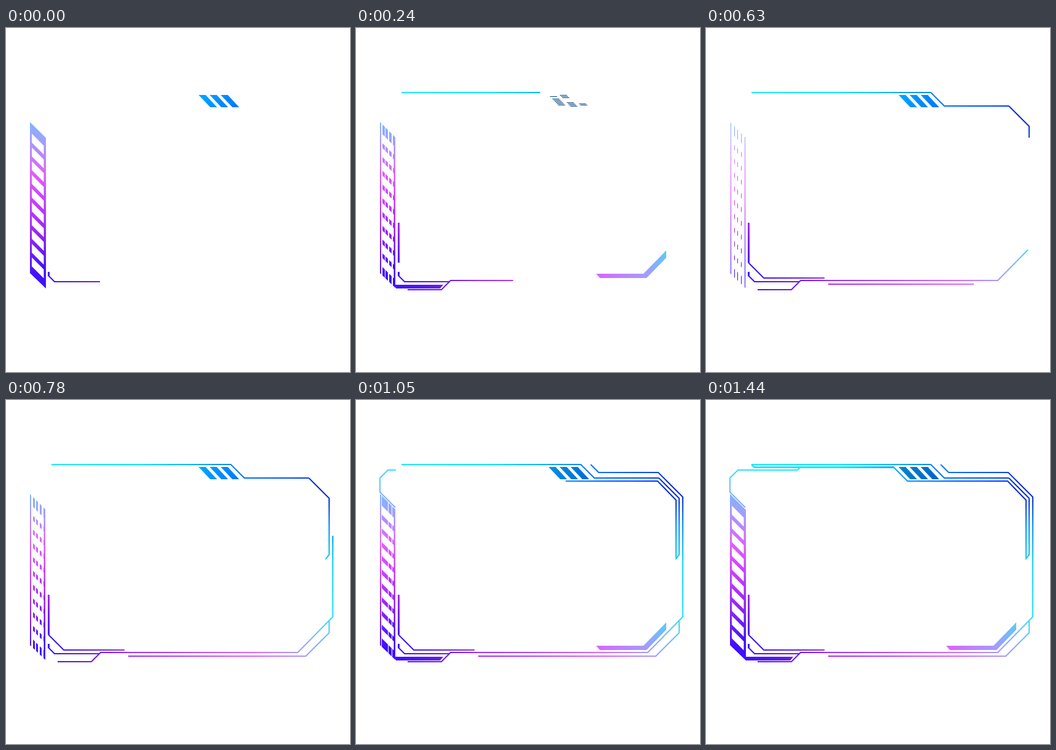
An HTML page with a canvas for the animation above (1800 ms loop, 560x560 px).

```html
<!DOCTYPE html>
<html lang="en">
<head>
<meta charset="utf-8">
<title>HUD frame</title>
<style>
html, body { margin: 0; width: 100%; height: 100%; overflow: hidden; background: #fff; }
canvas { display: block; width: 560px; height: 560px; }
</style>
</head>
<body>
<canvas id="stage" width="560" height="560"></canvas>
<script>
const ctx = document.getElementById('stage').getContext('2d');
const LOOP = 1800, STEP = 30, LAST = 1440;
const clamp = v => Math.max(0, Math.min(1, v));
const noise = n => Math.abs(Math.sin(n * 78.233 + 1.7) * 43758.5453) % 1;

// One colour wheel around the centre paints every part; keys are degrees.
const wheel = ctx.createConicGradient(0, 285, 265);
Object.entries({
  0: '#10d4f0', 20: '#28e0ff', 25: '#60c8f8', 37: '#a898ff', 51: '#d966ff',
  84: '#b848f8', 120: '#9c30f4', 133: '#6a1cea', 145: '#4010ff', 150: '#4010ff',
  162: '#9024f2', 176: '#c840ff', 187: '#e060f8', 200: '#a0a0ff', 209: '#58ccff',
  217: '#20e8fa', 246: '#00e8ff', 275: '#00b4ff', 300: '#0080ff', 322: '#0050f8',
  331: '#0828c8', 338: '#0838d8', 346: '#0090ff', 360: '#10d4f0'
}).forEach(([degrees, color]) => wheel.addColorStop(degrees / 360, color));

// Lines grow evenly from start to end along their points.
const line = (start, end, width, ...points) => ({ start, end, width, points });
const lines = [
  line(-1, 0, 3, 69.5,397, 69.5,404),
  line(-1, 0, 2, 69,403, 79,413, 153,413),
  line(75, 240, 3, 69.5,317, 69.5,382),
  line(240, 580, 2, 69,382, 94,407, 193,407),
  line(0, 645, 2, 84,426, 139,426, 154,411, 475,411, 532,353),
  line(645, 1020, 2, 532,353, 532,158, 492,118, 395,118, 382,105),
  line(440, 730, 2, 199,417, 488,417, 526,379, 526,360),
  line(0, 455, 2, 74,105, 366,105, 388,127, 493,127),
  line(510, 900, 2, 493,127, 526,160, 526,252, 521,258, 521,192),
  line(900, 1080, 2, 521,192, 521,163, 491,132, 328,132, 306,110),
  line(1080, 1170, 3, 306,109.5, 79,109.5, 74,105),
  line(930, 1170, 2, 64,175, 39,150, 39,127, 52,114, 149,114, 153,110)
];

// Thick pieces flash early, then return for good.
const blocks = [
  { back: 1050, points: [63,418, 142,418, 137,424, 65,424] },
  { back: 800, points: [391,400, 468,400, 505,362, 505,374, 473,407, 397,407] }
];

function trace(points) {
  ctx.moveTo(points[0], points[1]);
  for (let i = 2; i < points.length; i += 2) ctx.lineTo(points[i], points[i + 1]);
}

function fillShape(points) {
  ctx.beginPath();
  trace(points);
  ctx.fill();
}

function pathLength(points) {
  let sum = 0;
  for (let i = 2; i < points.length; i += 2)
    sum += Math.hypot(points[i] - points[i - 2], points[i + 1] - points[i - 1]);
  return sum;
}

function drawLine({ start, end, width, points }, t) {
  const shown = clamp((t - start) / (end - start));
  if (!shown) return;
  ctx.beginPath();
  trace(points);
  ctx.lineWidth = width;
  ctx.setLineDash([shown * pathLength(points), 5000]);
  ctx.stroke();
}

// Side panel seen through vertical slats that close and reopen.
function drawPanel(t) {
  const width = Math.round(0.8 + 5 * clamp(Math.abs(t - 570) / 570));
  ctx.save();
  ctx.beginPath();
  for (let i = 0; i < 5; i++) {
    const right = Math.round(41 + 5.7 * i);
    ctx.rect(right - width, 150, width + (width > 5), 276);
  }
  ctx.clip();
  ctx.beginPath();
  trace([39,153, 65,179, 65,424, 39,399]);
  for (let i = 0; i < 10; i++) {
    const y = 172 + 22.4 * i;
    trace([42, y + 14.5, 61.5, y + 34, 61.5, y + 19.5, 42, y]);
  }
  ctx.fill();
  ctx.restore();
}

// Three slanted bars that break into dark rows and fill in again.
function drawBars(t) {
  const dip = low => clamp(t < low ? (low - t) / 150 : (t - low) / 300);
  const cover = Math.min(dip(150), dip(1185));
  for (let bar = 0; bar < 3; bar++) {
    const x = 313.5 + 18 * bar;
    ctx.save();
    ctx.beginPath();
    for (let row = 0; row < 10; row++)
      if (noise(bar * 10 + row) < Math.sqrt(cover))
        ctx.rect(x, 109 + 2 * row, 40, 1 + Math.round(cover));
    ctx.clip();
    fillShape([x, 109, x + 11.5, 109, x + 30, 129, x + 19, 129]);
    ctx.fillStyle = `rgba(0, 20, 40, ${Math.min(0.6, 1.5 * (1 - cover))})`;
    ctx.fill();
    ctx.restore();
  }
}

function draw(t) {
  ctx.fillStyle = '#fff';
  ctx.fillRect(0, 0, 560, 560);
  ctx.fillStyle = ctx.strokeStyle = wheel;
  drawPanel(t);
  drawBars(t);
  for (const { back, points } of blocks)
    if ((t >= 120 && t < 520) || t >= back) fillShape(points);
  for (const item of lines) drawLine(item, t);
}

function tick() {
  const t = performance.now() % LOOP;
  draw(Math.min(LAST, Math.floor(t / STEP) * STEP));
  requestAnimationFrame(tick);
}
tick();
</script>
</body>
</html>
```
